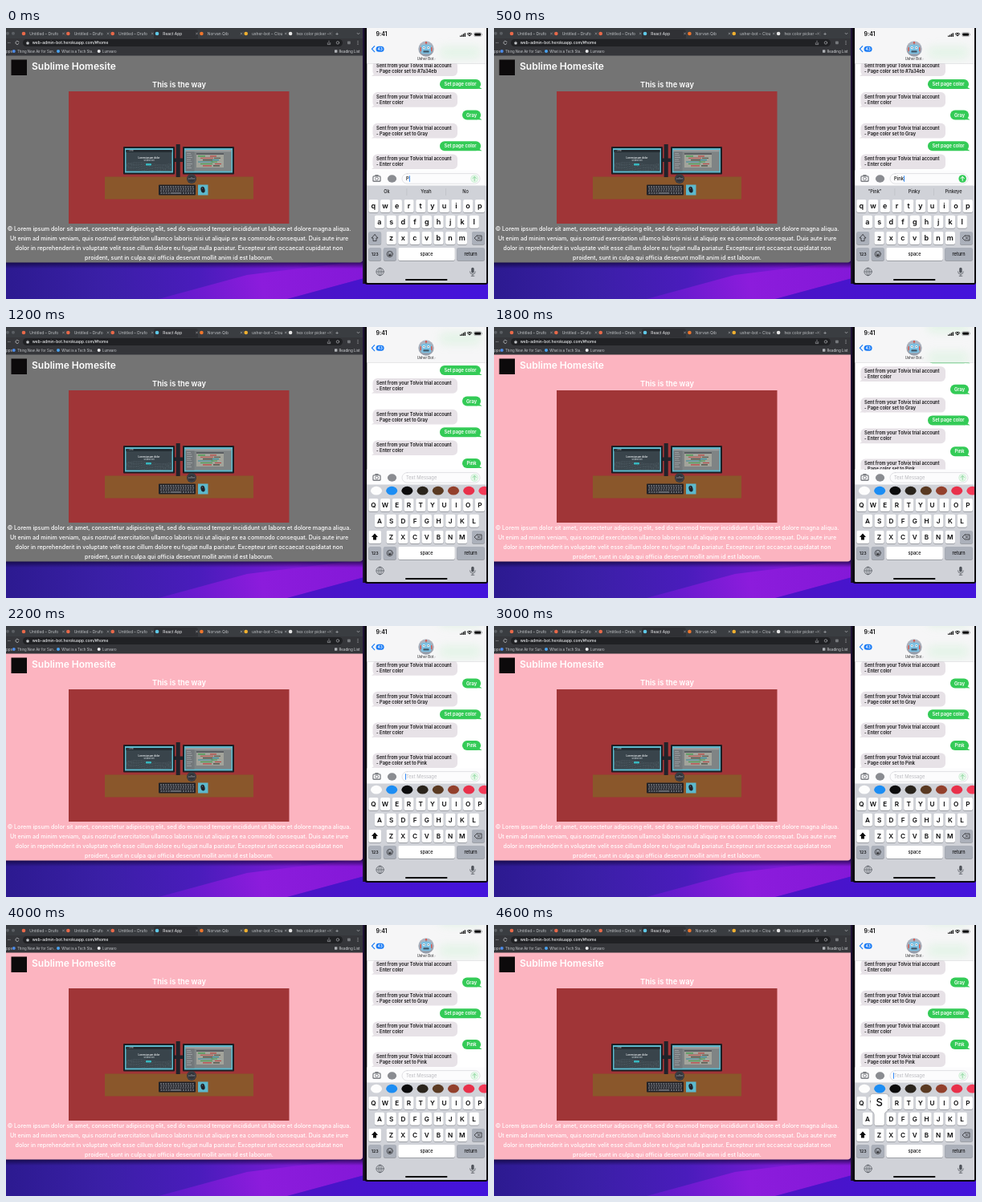
An HTML page with a canvas that plays this animation: 600 by 338 pixels, repeating every 4700 ms.

```html
<!DOCTYPE html>
<html lang="en">
<head>
<meta charset="utf-8">
<title>Chat bot page color</title>
<style>
html, body { margin: 0; width: 100%; height: 100%; overflow: hidden; background: #2a1580; }
canvas { display: block; width: 600px; height: 338px; }
</style>
</head>
<body>
<canvas id="stage"></canvas>
<script>
const W = 600, H = 338, LOOP = 4700, STEP = 100;
const SEND = 800, REPAINT = 1700, REPLY = 1800, PRESS = 4500;
const SANS = 'Inter, "Open Sans", sans-serif';
const GREEN = '#34cb57', BLUE = '#1b7cf5', KEYPAD = '#d0d2d8';

const canvas = document.getElementById('stage');
const ctx = canvas.getContext('2d');
const dpr = window.devicePixelRatio || 1;
canvas.width = W * dpr;
canvas.height = H * dpr;

function rect(x, y, w, h, color, r = 0) {
  ctx.fillStyle = color;
  ctx.beginPath();
  ctx.roundRect(x, y, w, h, r);
  ctx.fill();
}

function oval(x, y, rx, color, ry = rx) {
  ctx.fillStyle = color;
  ctx.beginPath();
  ctx.ellipse(x, y, rx, ry, 0, 0, Math.PI * 2);
  ctx.fill();
}

function line(points, color, width = 0.8) {
  ctx.strokeStyle = color;
  ctx.lineWidth = width;
  ctx.lineCap = ctx.lineJoin = 'round';
  ctx.beginPath();
  for (let i = 0; i < points.length; i += 2) ctx.lineTo(points[i], points[i + 1]);
  ctx.stroke();
}

function poly(points, color) {
  ctx.fillStyle = color;
  ctx.beginPath();
  for (let i = 0; i < points.length; i += 2) ctx.lineTo(points[i], points[i + 1]);
  ctx.fill();
}

function ring(x, y, r, color, width = 0.7, from = 0, to = Math.PI * 2) {
  ctx.strokeStyle = color;
  ctx.lineWidth = width;
  ctx.beginPath();
  ctx.arc(x, y, r, from, to);
  ctx.stroke();
}

function text(str, x, y, size, color, weight = 400, align = 'left') {
  ctx.font = `${weight} ${size}px ${SANS}`;
  ctx.textAlign = align;
  ctx.textBaseline = 'alphabetic';
  ctx.fillStyle = color;
  ctx.fillText(str, x, y + size * 0.35);
}

function fade(x0, y0, x1, y1, colors) {
  const g = ctx.createLinearGradient(x0, y0, x1, y1);
  colors.forEach((c, i) => g.addColorStop(i / (colors.length - 1), c));
  return g;
}

function ease(t, start, length) {
  const p = Math.min(1, Math.max(0, (t - start) / length));
  return 1 - (1 - p) ** 3;
}

function wallpaper() {
  rect(0, 0, W, H, fade(0, 300, W, 330, ['#2c1a90', '#3a1fa6', '#4a1cbc', '#7a1ad4', '#5214cc', '#4414dc']));
  poly([190, 338, 300, 308, 446, 290, 446, 312, 350, 338], fade(190, 338, 446, 292, ['#5a1ac8', '#8c1cdc', '#8418d8']));
  poly([350, 338, 446, 312, 600, 318, 600, 338], fade(350, 330, 600, 330, ['#4a14c4', '#4414dc']));
  rect(0, 291, 446, 9, fade(0, 291, 0, 300, ['rgba(12,5,45,.8)', 'rgba(12,5,45,0)']));
}

const TABS = [
  ['Untitled – Drufo', '#e8694a'], ['Untitled – Drufo', '#e8694a'], ['Untitled – Drufo', '#e8694a'],
  ['React App', '#5fc9e8'], ['Norvan Qib', '#f0762c'], ['usher-bot – Clou', '#f0b030'], ['hex color picker –', '#e6e6e6']
];

function browserBars() {
  rect(0, 0, 444, 13, '#3a3d41');
  rect(0, 13, 444, 21.5, '#35363a');
  rect(184, 2, 55, 11.5, '#303135', [3, 3, 0, 0]);
  oval(2, 6.7, 2, '#5b5f64');
  oval(9, 6.7, 2, '#5b5f64');
  TABS.forEach(([name, color], i) => {
    const x = 22 + i * 55.35;
    oval(x, 7, 2.3, color);
    text(name, x + 7.3, 7, 4.9, i === 3 ? '#f2f3f5' : '#c0c3c7');
    line([x + 48.5, 6, x + 50.5, 8], '#b0b3b7', 0.5);
    line([x + 50.5, 6, x + 48.5, 8], '#b0b3b7', 0.5);
    if (i !== 2 && i !== 3) line([x + 52, 4.5, x + 52, 9.5], '#5d6064', 0.4);
  });
  text('+', 412, 7, 7, '#c4c7ca', 400, 'center');
  line([437, 6.3, 438.5, 7.9, 440, 6.3], '#c4c7ca', 0.6);

  rect(21, 14, 398, 9, '#202124', 4.5);
  line([2, 18.4, 5.5, 18.4], '#8b8e92', 0.6);
  ring(14, 18.4, 2.1, '#d0d2d5', 0.7, 0.5, 5.9);
  rect(25.5, 17.8, 3, 2.6, '#c4c7ca', 0.4);
  ring(27, 17.8, 1, '#c4c7ca', 0.5, Math.PI, 0);
  text('web-admin-bot.herokuapp.com/#home', 32.8, 18.4, 5, '#eceef0', 500);
  line([402, 19.5, 402, 16], '#c4c7ca', 0.5);
  line([400.3, 18.5, 400.3, 20.6, 403.7, 20.6, 403.7, 18.5], '#c4c7ca', 0.5);
  ring(413, 18.4, 1.7, '#c4c7ca', 0.6);
  rect(425, 16.5, 3.8, 3.8, '#77797d', 0.8);
  for (let i = 0; i < 3; i++) oval(438, 16.5 + i * 1.9, 0.5, '#d0d2d5');

  text('Apps', -3, 29, 4.4, '#c9ccd0');
  [[8.8, 'Thing New Air for Sun...', '#4c8be8'], [64, 'What is a Tech Sta...', '#4aa3f0'],
   [114.7, 'Lumvaro', '#e9eaec']].forEach(([x, name, color]) => {
    oval(x + 1, 29, 2, color);
    text(name, x + 5.3, 29, 4.3, '#c9ccd0');
  });
  rect(409, 27.3, 3.4, 3.4, '#aeb1b5', 0.5);
  text('Reading List', 414.5, 29, 4.5, '#d5d7da');
}

function monitor(x) {
  rect(x, 148, 64, 34.5, '#1d1e23', 1);
  rect(x + 2, 150, 60, 30.5, '#5cb9cd');
}

function picture() {
  rect(78, 79, 274.5, 165, '#a03537');
  rect(123, 185.5, 185, 28, '#8a572b');
  rect(211.7, 145, 5, 41, '#22232a');
  rect(207, 162.5, 16, 4.5, '#22232a');
  monitor(146);
  monitor(220);

  rect(149.5, 152, 57, 26.5, '#39444b');
  rect(149.5, 152, 57, 3, '#232b31');
  text('• Lorem', 151, 153.5, 2, '#cfd8dc');
  text('Lorem ipsum dolor', 178, 162, 3, '#f0f4f6', 600, 'center');
  text('sit amet elit', 178, 165.5, 2.4, '#d9e2e6', 500, 'center');
  for (let k = 0; k < 7; k++) {
    for (let i = 0; i < 28; i++) {
      const y = 169 + k * 1.4 - 1.5 * Math.sin(i * 0.22 + k * 0.15);
      oval(150.5 + i * 2, y, 0.32, '#7d8d95');
    }
  }
  rect(174, 169, 7, 2.4, '#37b8c0', 0.6);

  rect(223.5, 152, 57, 26.5, '#7f8485');
  rect(223.5, 152, 57, 2.2, '#9a9e9f');
  rect(223.5, 154.2, 11, 24.3, '#73787b');
  rect(237, 156, 34, 18, '#a3a49b');
  rect(237, 156, 34, 2, '#595d61');
  const inks = ['#3e9b49', '#b8433f', '#49443b', '#2f8b9b'];
  for (let i = 0; i < 6; i++) {
    rect(239 + (i % 3) * 3, 159.3 + i * 2.4, 9 + (i * 7) % 11, 1.1, inks[i % 4]);
    rect(254 + (i * 5) % 7, 159.3 + i * 2.4, 8, 1.1, inks[(i + 1) % 4]);
  }
  for (let i = 0; i < 8; i++) rect(225, 156 + i * 2.6, 5 + (i % 3), 0.7, '#a5a9ab');

  oval(231, 188, 6, '#33343a');
  ring(231, 188, 4.8, '#53555c', 0.6);
  text('coffee', 231, 188, 2.6, '#a4a7ad', 500, 'center');

  rect(190, 195.5, 46, 13, '#212228', 1);
  for (let r = 0; r < 4; r++) {
    for (let i = 0; i < 14; i++) {
      if (r === 3 && i > 3 && i < 9) continue;
      rect(192 + i * 3.05 + (r % 2) * 0.5, 197.2 + r * 2.6, 2, 1.7, '#73757b', 0.3);
    }
  }
  rect(204.5, 205, 14, 1.7, '#73757b', 0.3);
  rect(239, 195.5, 12.5, 13, '#5cb9cd');
  ctx.save();
  ctx.translate(245, 201.7);
  ctx.rotate(-0.25);
  oval(0, 0, 2.5, '#202127', 3.9);
  line([0, -2.8, 0, -1], '#6b6d73', 0.6);
  ctx.restore();
}

const PARAGRAPH = [
  '© Lorem ipsum dolor sit amet, consectetur adipiscing elit, sed do eiusmod tempor incididunt ut labore et dolore magna aliqua.',
  'Ut enim ad minim veniam, quis nostrud exercitation ullamco laboris nisi ut aliquip ex ea commodo consequat. Duis aute irure',
  'dolor in reprehenderit in voluptate velit esse cillum dolore eu fugiat nulla pariatur. Excepteur sint occaecat cupidatat non',
  'proident, sunt in culpa qui officia deserunt mollit anim id est laborum.'
];

function browser(t) {
  ctx.save();
  ctx.beginPath();
  ctx.roundRect(-10, -10, 454, 302.5, 4);
  ctx.clip();
  rect(0, 34, 444, 260, t < REPAINT ? '#747474' : '#fcb4c0');
  browserBars();
  rect(6.5, 39.5, 19.5, 19.5, '#0c0a0b');
  text('Sublime Homesite', 32, 48.2, 12, '#fff', 600);
  text('This is the way', 215.5, 70.8, 9.3, '#fff', 600, 'center');
  picture();
  PARAGRAPH.forEach((s, i) => text(s, 215.5, 250.4 + i * 12.2, 7.13, '#fff', 500, 'center'));
  ctx.restore();
}

// Each row: y, words, width of a green bubble (0 for gray), time it appears.
const CHAT = [
  [31.5, 'Set page color', 51],
  [50.5, '- Page color set to #7a34eb'],
  [70, 'Set page color', 51],
  [89.3, '- Enter color'],
  [108.5, 'Gray', 23],
  [128, '- Page color set to Gray'],
  [147.2, 'Set page color', 51],
  [166.6, '- Enter color'],
  [186, 'Pink', 23, SEND],
  [204.6, '- Page color set to Pink', 0, REPLY]
];

function bubble(y, str, w) {
  if (w) {
    rect(591 - w, y - 6, w, 12, GREEN, 5.8);
    poly([587, y + 2, 592.5, y + 6, 585, y + 5.8], GREEN);
    text(str, 591 - w / 2, y, 5.75, '#fff', 600, 'center');
  } else {
    rect(456.5, y - 9.2, 105.5, 18.6, '#e7e2e7', 5.6);
    poly([461, y + 5, 455, y + 9.4, 463, y + 9.2], '#e7e2e7');
    text('Sent from your Tolvix trial account', 461, y - 3.4, 5.65, '#141315', 600);
    text(str, 461, y + 3.7, 5.65, '#141315', 600);
  }
}

function header(scroll) {
  rect(449, 0, 150, 44.3, '#f6f6f7');
  ctx.save();
  ctx.beginPath();
  ctx.rect(449, 0, 150, 44.3);
  ctx.clip();
  ctx.filter = `blur(${6 * dpr}px)`;
  for (const [y, , w] of CHAT) {
    if (w && y - scroll < 50) rect(591 - w, y - scroll - 8, w, 14, 'rgba(150,235,165,.2)', 6);
  }
  ctx.restore();
  rect(449, 44, 150, 0.4, '#cfcfd3');

  text('9:41', 467.5, 8, 7, '#0b0b0c', 600, 'center');
  for (let i = 0; i < 4; i++) rect(565 + i * 1.9, 9.5 - i * 1.1, 1.3, 1.4 + i * 1.1, '#0b0b0c', 0.3);
  for (let i = 1; i < 4; i++) ring(577, 11, i * 1.55, '#0b0b0c', 1, -2.35, -0.8);
  ctx.strokeStyle = '#8d8d90';
  ctx.lineWidth = 0.5;
  ctx.beginPath();
  ctx.roundRect(582.5, 5.6, 9.3, 5, 1.4);
  ctx.stroke();
  rect(583.3, 6.4, 7.7, 3.4, '#0b0b0c', 0.8);
  rect(592.3, 7.3, 0.7, 1.6, '#8d8d90', 0.3);

  line([458.7, 22.7, 455.4, 26.2, 458.7, 29.7], BLUE, 1.2);
  rect(460.6, 22.8, 10, 7, BLUE, 3.5);
  text('43', 465.6, 26.3, 4.8, '#fff', 600, 'center');

  oval(523, 26, 9.7, fade(0, 16, 0, 36, ['#b4bac6', '#9299a6']));
  line([523, 18.5, 523, 21.5], '#566b7c', 0.8);
  oval(523, 18.3, 1.2, '#d8584f');
  rect(515.6, 24.1, 2, 5, '#d8584f', 0.8);
  rect(528.4, 24.1, 2, 5, '#d8584f', 0.8);
  rect(517, 20.7, 12, 11.5, '#7cc0e2', 2);
  oval(520.2, 24.6, 1.6, '#f6fbff');
  oval(525.8, 24.6, 1.6, '#f6fbff');
  oval(520.2, 24.6, 0.7, '#334654');
  oval(525.8, 24.6, 0.7, '#334654');
  rect(519.4, 28.3, 7.2, 2.2, '#42596a', 0.6);
  text('Usher Bot', 522, 38.8, 4.4, '#1d1d1f', 400, 'center');
  line([533.4, 37.8, 534.4, 38.8, 533.4, 39.8], '#a5a5aa', 0.5);
}

function inputBar(t) {
  const typed = t < SEND ? 'Pink'.slice(0, t < 100 ? 1 : t < 200 ? 2 : t < 400 ? 3 : 4) : '';
  rect(449, 177.6, 150, 19, '#fcfcfd');
  rect(456.3, 184.3, 10.4, 7.6, '#7f8186', 1.6);
  rect(459.2, 183, 4.6, 2.5, '#7f8186', 0.8);
  rect(457.6, 185.6, 7.8, 5, '#fcfcfd', 0.8);
  ring(461.5, 188, 1.9, '#7f8186', 0.9);
  oval(480.5, 188, 5.6, '#8a8c91', 4.7);

  ctx.strokeStyle = '#cfcfd4';
  ctx.lineWidth = 0.6;
  ctx.beginPath();
  ctx.roundRect(493, 181.6, 97, 12.6, 6.3);
  ctx.stroke();

  let caret = 497.5;
  if (typed) {
    text(typed, 498, 188, 5.8, '#111', 500);
    caret = 498.6 + ctx.measureText(typed).width;
  } else {
    text('Text Message', 498, 188, 5.8, '#b9b9be', 400);
  }
  const blink = t % 1000;
  if (typed || (t > SEND + 500 && blink > 150 && blink < 700)) rect(caret - 0.4, 184.3, 0.9, 7.5, BLUE);

  const ready = typed.length > 1;
  oval(583.2, 188, 4.8, ready ? GREEN : '#c7eed0');
  if (!ready) oval(583.2, 188, 4.1, '#e5f7e9');
  const ink = ready ? '#fff' : '#8fd7a0';
  line([583.2, 190.7, 583.2, 185.5], ink, 1);
  line([581, 187.6, 583.2, 185.4, 585.4, 187.6], ink, 1);
}

function key(x, y, w, color = '#fff') {
  rect(x, y + 0.7, w, 16, '#8d9096', 2);
  rect(x, y, w, 16, color, 2);
}

function shiftArrow(filled) {
  const pts = [459, 257.6, 463, 261.9, 461, 261.9, 461, 265.6, 457, 265.6, 457, 261.9, 455, 261.9, 459, 257.6];
  if (filled) poly(pts, '#0b0b0c');
  else line(pts, '#1b1b1d', 0.7);
}

const STRIP = ['#fdfdfd', '#1c8df3', '#0b0b0c', '#2a241c', '#5a3a22', '#93402c', '#e8304a', '#f43b58'];
const ROWS = [['qwertyuiop', 457.3, 214], ['asdfghjkl', 464.9, 233.8], ['zxcvbnm', 479.5, 254]];

function keyboard(t) {
  const upper = t >= SEND;
  rect(449, 196.5, 150, 122, KEYPAD);
  if (upper) {
    STRIP.forEach((c, i) => oval(461 + i * 19.2, 204.2, 7, c, 5.4));
  } else {
    const words = t < 300 ? ['Ok', 'Yeah', 'No'] : ['“Pink”', 'Pinky', 'Pinkeye'];
    words.forEach((s, i) => text(s, 474 + i * 49, 204.5, 5.6, '#1b1b1d', 500, 'center'));
    rect(498.7, 200, 0.5, 9, '#b4b7bd');
    rect(547.5, 200, 0.5, 9, '#b4b7bd');
  }
  for (const [letters, x0, y] of ROWS) {
    [...letters].forEach((c, i) => {
      const x = x0 + i * 14.72;
      key(x - 6, y, 12.2);
      text(upper ? c.toUpperCase() : c, x, y + (upper ? 8.4 : 7.8), upper ? 8.2 : 9, '#0b0b0c', 600, 'center');
    });
  }
  const dark = '#abb0ba';
  key(451.3, 254, 15.8, upper ? '#fff' : dark);
  shiftArrow(upper);
  key(580, 254, 15.8, dark);
  line([586, 259, 592, 259, 592, 265, 586, 265, 583, 262, 586, 259], '#1b1b1d', 0.7);
  line([587.2, 260.7, 589.8, 263.3], '#1b1b1d', 0.6);
  line([589.8, 260.7, 587.2, 263.3], '#1b1b1d', 0.6);

  key(451.3, 274, 15.8, dark);
  text('123', 459.2, 282, 5.4, '#0b0b0c', 500, 'center');
  key(469.8, 274, 16, dark);
  ring(477.8, 282, 3.6, '#1b1b1d', 0.7);
  oval(476.5, 281, 0.6, '#1b1b1d');
  oval(479.1, 281, 0.6, '#1b1b1d');
  ctx.fillStyle = '#1b1b1d';
  ctx.beginPath();
  ctx.arc(477.8, 282.5, 2, 0, Math.PI);
  ctx.fill();
  key(488.3, 274, 70.5);
  text('space', 523.5, 282, 5.5, '#0b0b0c', 500, 'center');
  key(561.2, 274, 34.6, dark);
  text('return', 578.5, 282, 5.5, '#0b0b0c', 500, 'center');

  const gray = '#50545b';
  ring(465.6, 304, 4.7, gray);
  line([460.9, 304, 470.3, 304], gray, 0.6);
  line([465.6, 299.3, 465.6, 308.7], gray, 0.6);
  ctx.beginPath();
  ctx.ellipse(465.6, 304, 2.2, 4.7, 0, 0, Math.PI * 2);
  ctx.stroke();
  rect(579.2, 298.8, 3.4, 6.8, gray, 1.7);
  ring(580.9, 303.8, 3.4, gray, 0.7, 0, Math.PI);
  line([580.9, 307.3, 580.9, 309.3], gray, 0.7);
  line([578.9, 309.3, 582.9, 309.3], gray, 0.7);
  rect(497, 313, 52.5, 1.9, '#0b0b0c', 1);
  if (t >= PRESS) popup(479.6);
}

function popup(x) {
  ctx.save();
  ctx.shadowColor = 'rgba(0,0,0,.35)';
  ctx.shadowBlur = 2 * dpr;
  ctx.fillStyle = '#fff';
  ctx.beginPath();
  ctx.moveTo(x - 8, 211);
  ctx.lineTo(x + 8, 211);
  ctx.quadraticCurveTo(x + 11, 211, x + 11, 214);
  ctx.lineTo(x + 11, 228);
  ctx.bezierCurveTo(x + 11, 233, x + 6.2, 232, x + 6.2, 237);
  ctx.lineTo(x + 6.2, 248);
  ctx.quadraticCurveTo(x + 6.2, 250, x + 4.2, 250);
  ctx.lineTo(x - 4, 250);
  ctx.quadraticCurveTo(x - 6, 250, x - 6, 248);
  ctx.lineTo(x - 6, 237);
  ctx.bezierCurveTo(x - 6, 232, x - 11, 233, x - 11, 228);
  ctx.lineTo(x - 11, 214);
  ctx.quadraticCurveTo(x - 11, 211, x - 8, 211);
  ctx.fill();
  ctx.restore();
  text('S', x, 221.8, 13, '#0b0b0c', 500, 'center');
}

function phone(t) {
  const scroll = 16 * ease(t, SEND - 100, 300) + 21 * ease(t, REPLY - 100, 300);
  rect(444, 0, 5, 319, fade(444, 0, 448, 0, ['#241440', '#0a070f']));
  rect(446.5, -10, 153.5, 330, '#0a080f', 3);
  ctx.save();
  ctx.beginPath();
  ctx.roundRect(449.3, -10, 148.7, 328, 1.5);
  ctx.clip();
  rect(449, 0, 150, 318, '#fff');
  for (const [y, str, w, from = 0] of CHAT) {
    if (t >= from) bubble(y - scroll, str, w);
  }
  header(scroll);
  inputBar(t);
  keyboard(t);
  ctx.restore();
}

function draw(now) {
  const t = Math.floor((now % LOOP) / STEP) * STEP;
  ctx.setTransform(dpr, 0, 0, dpr, 0, 0);
  wallpaper();
  browser(t);
  phone(t);
}

const start = performance.now();
function tick() {
  draw(performance.now() - start);
  requestAnimationFrame(tick);
}
tick();
</script>
</body>
</html>
```
